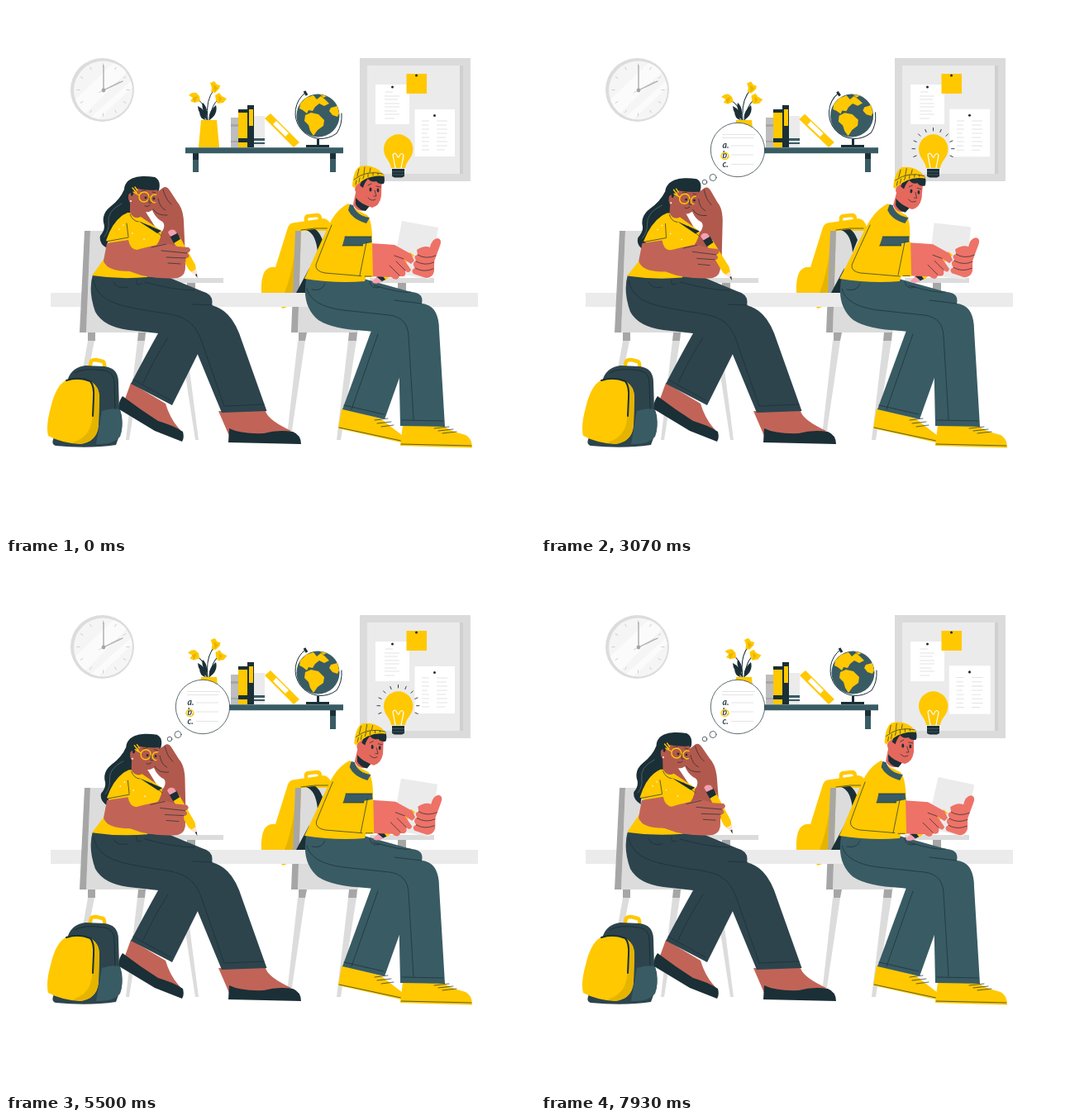
An HTML page for the animation above (8 s loop, 640 px wide and 640 px high).

```html
<!DOCTYPE html>
<html lang="en">
<head>
<meta charset="utf-8">
<title>Exam day</title>
<style>
html,body{margin:0;width:100%;height:100%;overflow:hidden;background:#fff}
svg{display:block;width:100vw;height:100vh}
.y{fill:#ffc800}.ys{fill:#e5b400}.d{fill:#1b2f36}.t{fill:#395b64}.p{fill:#2d444d}
.w{fill:#fff}.g1{fill:#ebebeb}.g2{fill:#dcdcdc}.g3{fill:#a6a6a6}
.s1{fill:#c16457}.s2{fill:#b2594d}.s3{fill:#ee7267}.s4{fill:#e5685d}
.l{fill:none;stroke:#1b2f36;stroke-width:1;stroke-linecap:round;stroke-linejoin:round}
.thin{stroke-width:.7}.bold{stroke-width:2}
.gl{fill:none;stroke:#e3e3e3;stroke-width:1}
.wl{fill:none;stroke:#fff;stroke-width:1.2;stroke-linecap:round}
.yl{fill:none;stroke:#ffc800;stroke-width:1.4;stroke-linecap:round}
.handle{stroke-width:4.5}
text{font:italic 700 10.5px Lato,sans-serif;fill:#2e444d}
</style>
</head>
<body>
<svg viewBox="0 0 640 640">
<!-- clock -->
<g>
<circle class="g2" cx="116.5" cy="101.5" r="38.5"/>
<circle fill="#f5f5f5" cx="117.5" cy="102" r="35.5"/>
<path class="w" d="M84 113 130 69Q140 72 146 80L96 130Q87 123 84 113ZM103 134 151 91 153 98 112 137Z" opacity=".6"/>
<g id="ticks" stroke="#cfcfcf" stroke-width="1"/>
<path d="M118 102V72M118 102 141 91" stroke="#a6a6a6" stroke-width="1.3" stroke-linecap="round"/>
<path d="M112 105 138 91" stroke="#c4c4c4" stroke-width=".7"/>
<circle class="g3" cx="118" cy="102" r="2.4"/>
</g>

<!-- pin board -->
<path fill="#dbdbdb" d="M428 63H562V212H428Z"/>
<path class="g1" d="M437 72H553V203H437Z"/>
<path fill="#cfcfcf" d="M549 72H553V203H549Z"/>
<g id="sheetA"><path class="w" d="M447 95H488V143H447Z"/>
<path class="gl" d="M459 104H468M458 109H476M458 113H474M458 118H476M458 122H476M458 127H473M458 131H476M458 136H470"/><circle class="d" cx="467.5" cy="98" r="1.5"/></g>
<g id="sheetB"><path class="w" d="M494.500 125H543V182H494.500Z"/>
<path class="gl" d="M503 139H512M521 139H534M503 144H511M521 144H533M503 149H512M521 149H534M503 154H510M521 154H534M503 159H512M521 159H532M503 164H512M521 164H534M503 169H511M521 169H534M503 174H512M521 174H531"/><circle class="d" cx="518.500" cy="132.500" r="1.5"/></g>
<g id="note"><path class="y" d="M484.500 82H509V106H484.500Z"/><circle class="d" cx="496.500" cy="84" r="1.5"/></g>

<!-- bulb -->
<g id="rays" stroke="#1b2f36" stroke-width=".9" stroke-linecap="round"/>
<path class="y" d="M466 196C465 187 457 184 457 173A17.700 17.700 0 0 1 492.400 173C492.400 184 484 187 483 196Z"/>
<path class="wl" d="M471 196 468 180Q471 176 473 181Q475 186 476 181Q479 176 481 181L478 196"/>
<path class="d" d="M467 197H482V206L479 207.500H470L467 206Z"/>
<path d="M467 200.500H482M467 204H482" stroke="#59747c" stroke-width=".6"/>

<!-- shelf -->
<path class="t" d="M226 178H233V201H226ZM392 178H399V201H392Z"/>
<path class="d" d="M226 178H233V186H226ZM392 178H399V185H392Z"/>
<g id="stemL"><path class="l" d="M243 138Q244 121 231 112"/><path class="y" d="M221 108Q225 104 230 105L234 109 235 115 228 117 223 115 226 111Z"/><path class="ys" d="M226 111 232 109 228 117Z"/></g>
<g id="stemR"><path class="l" d="M244 138Q241 113 252 101M246 138Q249 118 257 113"/><path class="y" d="M247 93 252 91 255 95 259 96 258 100 253 105 248 104 249 99ZM253 108 258 105 261 109 267 112 263 117 256 118 254 114Z"/><path class="ys" d="M251 95 256 99 252 104ZM257 109 261 112 258 117Z"/></g>
<path class="d" d="M244 138Q232 131 232 121Q241 125 244 138ZM246 138Q244 128 254 120Q257 131 246 138ZM242 138Q234 137 234 127ZM241 131Q236 123 238 117Q244 122 243 132Z"/>
<path class="y" d="M236 138H255L258 171H233Z"/>
<path fill="#bdbdbd" d="M272 135H281V171H272Z"/><path class="g3" d="M272 143H281V146H272ZM272 163H281V165H272Z"/>
<path class="y" d="M281 125H292V171H281Z"/><path class="d" d="M281 125H292V129H281ZM281 160H292V165H281Z"/>
<path class="d" d="M292 120H300V171H292Z"/><path class="y" d="M294 125H299V145H294Z"/>
<path class="g1" d="M300 133H313V171H300Z"/><path class="t" d="M300 160H313V163H300ZM300 165H313V167H300Z"/>
<g id="lean"><path class="y" d="M313 136 320 130 355 165 348 171Z"/><path class="w" d="M323 143 327 139 342 154 338 158Z"/></g>
<g id="globe">
<path class="l" d="M362 105A31 31 0 1 0 400 154Q407 144 406 130"/>
<path d="M361 103 364 108" stroke="#1b2f36" stroke-width="3"/>
<circle class="t" cx="377.500" cy="132.500" r="26"/>
<path class="y" d="M356 118 363 111 372 108 376 113 381 109 386 113 391 118 385 121 379 118 374 122 371 127 366 126 364 130 359 126 355 124ZM362 132 369 129 378 131 385 138 384 145 377 150 372 157 368 151 366 144 361 139ZM380 107 388 109 384 111ZM393 123 401 121 403 130 401 134 395 132 391 127Z"/>
</g>
<path class="d" d="M376 161H379V168H391V171H363V168H376Z"/>
<path class="t" d="M217 171.300H408V178.300H217Z"/>

<!-- thought bubble -->
<g id="bub1"><circle class="l thin" cx="198" cy="213" r="2.800"/></g>
<g id="bub2"><circle class="l thin" cx="208" cy="207.500" r="4"/></g>
<g id="bub3">
<circle class="l thin" cx="238" cy="174" r="32.700" style="fill:#fff"/>
<path class="gl bold" d="M219 155.500H259M219 159.500H257M230 169H257M230 180H257M230 191.500H257"/>
<text x="219.500" y="171.500">a.</text><text x="219.500" y="183.500">b.</text><text x="219.500" y="195">c.</text>
<ellipse class="yl" cx="222.500" cy="181.500" rx="4.500" ry="4"/>
</g>

<!-- boy's chair and bag, behind the desk -->
<path class="yl handle" d="M363 262V257Q363 254 367 254L376 253Q380 253 380 258"/>
<path class="y" d="M341 268Q343 262 350 262L384 257Q392 258 394 268L390 345L335 366 332 363 335 347H309Q308 330 313 321Q318 315 326 316Z"/>
<path class="ys" d="M349 300 347 347H337Q344 330 349 300Z"/>
<path class="g2" d="M353 405H362L345 520H340ZM414 405H424L405 525H400Z"/>
<path class="g3" d="M354 395H364L362 405H354ZM415 395H425L424 405H414Z"/>
<path class="g2" d="M357 272H400L426 395H353Z"/>
<path class="g3" d="M350 272H357L353 395H345Z"/>
<path class="y" d="M344 264 386 258 392 269 366 272H348Z"/>
<path class="d" d="M363 271Q375 275 377 298L383 283Q379 273 374 270ZM351 347 367 317 363 347Z"/>
<path class="l thin" d="M357 271Q374 268 390 269"/>

<!-- desk and girl's chair -->
<path class="g1" d="M54 347H571V364H54Z"/>
<path class="g2" d="M172 329H263V335H172ZM440 329H518V335H440Z"/>
<path class="g3" d="M219 335H229V347H219ZM474 335H484V347H474Z"/>
<path class="g2" d="M216 440H222L233 525H229ZM99 405H107L98 450H91ZM159 405H168L149 525H145Z"/>
<path class="g3" d="M99 395H108V405H99ZM160 395H169L168 405H159Z"/>
<path class="g2" d="M102 272H160L170 395H97Z"/>
<path class="g3" d="M95 272H102L97 395H89Z"/>

<!-- backpack -->
<path class="yl handle" d="M101 438 103 430Q104 428 109 428L117 430Q120 431 119 439"/>
<path class="p" d="M75 451Q80 437 96 435L119 436Q136 438 136 455L137 488Q142 495 140 512L133 531Q100 536 60 532Q54 530 58 522Z"/>
<path class="t" d="M116 490Q128 486 138 488Q143 510 138 521Q130 531 109 530Z"/>
<path class="l" d="M83 444Q94 437 119 441Q131 443 131 456L132 487"/>
<path class="y" d="M72 453Q86 449 101 454Q113 459 113 474L112 506Q111 527 90 530Q68 529 51 520Q48 508 54 486Q60 460 72 453Z"/>
<path class="ys" d="M104 455Q113 461 113 474L112 506Q111 527 90 530L80 528Q102 522 104 500Q109 475 104 455Z"/>
<path class="l bold" d="M73 453Q88 448 102 454Q107 460 106 474L105 496"/>

<!-- girl, legs -->
<path class="s1" d="M151 456 193 481Q199 501 211 513L204 517 143 478Z"/>
<path class="d" d="M141 472Q162 488 184 502Q204 508 214 515Q216 523 213 527L180 514 137 488Q135 480 141 472Z"/>
<path class="s1" d="M257 490H314Q317 501 345 514L335 520H270Z"/>
<path class="d" d="M270 511Q284 518 312 517Q329 512 347 515Q357 519 357 530L269 528Z"/>
<path class="p" d="M184 385V396Q165 430 151 457L201 483 235 415 225 385Z"/>
<path class="l thin" d="M196 401Q177 431 166 456M154 452 199 477"/>
<path class="p" d="M105 325Q99 345 108 370Q118 388 148 392L193 397Q218 400 228 412L261 492 315.500 490 286 407Q279 384 268 373Q260 365 249 362Q252 349 237 345L196 328Z"/>
<path class="l thin" d="M106 332C112 361 142 363 180 370C213 374 225 379 235 401L264 484 312 482M130 334Q134 343 147 340M158 331Q156 340 164 336M168 334Q204 344 228 344M250 362 226 361"/>

<!-- girl, upper body -->
<g id="girlTop">
<g id="girlHead">
<path class="d" d="M143 222C144 207 161 204 180 207Q188 211 185 223L166 244Q151 252 139 257Q133 267 130 280Q121 283 122 293Q112 287 114 278Q121 270 118 262Q116 251 126 243Q138 234 143 222Z"/>
<path class="wl" style="stroke:#6b7f85;stroke-width:.6" d="M140 239Q122 248 124 262Q125 271 119 279"/>
</g>
<path class="s2" d="M150 236 167 246 181 268 172 274 150 255Z"/>
<path class="s2" d="M190 220Q194 217 198 223L207 237Q214 244 215 260L217 305H178L178 285 190 271Q194 262 186 259Q177 252 176 241L181 237 179 228Z"/>
<path class="y" d="M147 250Q130 257 121 284L130 289Q117 309 104 326Q138 331 171 328L175 297Q188 286 188 272L163 255Q155 259 150 250Z"/>
<path class="d" d="M160 260 167 263 188 272 183 275Z"/>
<path class="l thin" d="M150 252Q153 260 160 261M146 263 148 279M121 285 148 280M174 266 188 278"/>
<g class="w"><circle cx="137" cy="270" r=".8"/><circle cx="153" cy="275" r=".8"/><circle cx="167" cy="282" r=".8"/><circle cx="121" cy="313" r=".8"/><circle cx="142" cy="265" r=".8"/></g>
<g id="girlFace">
<path class="s2" d="M153 219Q166 224 183 222L184 233Q182 246 173 249Q161 251 156 241Q147 240 148 229Q150 224 153 228Z"/>
<path class="d" d="M151 229Q150 213 167 209Q181 210 185 222Q173 224 161 220Q155 222 153 230Z"/>
<path class="yl" d="M153 220 158 226M156 219 159 223M154 225 161 229"/>
<circle class="yl" cx="167" cy="231" r="6"/><circle class="yl" cx="180" cy="233" r="5"/>
<path class="l thin" d="M173 232 173 238 176 238M168 242Q171 244 174 241M164 224 169 223M177 225 181 226"/>
<circle class="d" cx="169" cy="232" r="1.400"/><circle class="d" cx="179" cy="233" r="1.400"/>
<circle class="w" cx="151" cy="236" r="1"/>
</g>
<path class="s2" d="M190 220Q194 218 198 224L209 240 207 264 188 260Q177 252 176 242L182 237 180 231Z"/>
<path class="l thin" d="M190 222Q193 234 200 240M184 233Q186 244 193 247M178 246Q183 254 195 253"/>
</g>
<path class="s1" d="M118 310 150 295 217 298V314Q218 326 208 329Q190 331 164 326Z"/>
<g id="pencil">
<path class="y" d="M202 284 210 279 229 313 231 327 221 319Z"/><path fill="#fbe3cf" d="M224 322 230 318 231.500 328Z"/>
<path class="d" d="M198 278 207 274 211 282 203 287ZM229 325 231 324 231.500 329Z"/><path fill="#f3a0b0" d="M196 274Q198 269 204 271L207 275 199 279Z"/>
</g>
<g id="girlArm">
<path class="s1" d="M122 287 148 283Q150 294 158 295Q180 289 194 287L208 291 221 292Q226 296 219 299Q225 303 217 306Q220 311 211 312Q202 315 192 312Q180 319 150 321Q121 321 118 308Z"/>
<path class="l thin" d="M188 296 219 299M194 304 217 305M196 311 211 312M176 292Q185 290 194 288"/>
</g>

<!-- boy, legs -->
<path class="y" d="M406 487 453 499 480 520 478 528 402 511Z"/><path class="l thin" d="M403 510 478 526M446 501 462 499M449 505 466 503M454 509 469 507"/>
<path class="y" d="M480 507 529 508Q536 514 556 519Q564 523 564 534.500L477 532Z"/><path class="l thin" d="M478 530 563 532M518 511 536 509M523 514 541 512M528 517 545 515"/>
<path class="t" d="M443 390 407 488 458 500 478 444 474 392Z"/><path class="l thin" d="M450 397 418 488M409 483 457 494"/>
<path class="t" d="M364 326Q356 362 378 380Q395 391 435 393L464 396Q475 398 475 413L477 508 531 509 524 392Q524 362 503 360Q506 347 490 346L433 330Z"/>
<path class="l thin" d="M364 342Q369 363 408 368L464 374Q486 377 487 399L493 500M479 501 529 502M440 334Q443 344 452 340M386 336Q382 346 370 343M503 360 470 356M445 338Q478 348 490 346"/>

<!-- boy, upper body -->
<g id="boyTop">
<path class="y" d="M414 239Q400 246 391 264L361 330Q400 336 434 333L443 300 443 283Q443 260 437 253L425 247Z"/>
<path class="t" d="M416 240 414 247Q419 258 436 263L440 256Q424 254 420 241Z"/>
<path class="t" d="M410 279H442L443 290H407Z"/><path class="l thin" d="M410 279H442M407 290H443M394 265Q383 292 375 313Q374 321 386 323L434 327"/>
</g>
<g id="boyHead">
<path class="s4" d="M424 221 441 237 435 247Q424 250 420 240Z"/><path class="d" d="M423 232Q431 241 440 242L435 248Q427 247 423 240Z"/>
<path class="s4" d="M427 209 455 209Q454 220 454 230Q452 242 443 244Q429 240 427 226Q420 226 423 217Z"/>
<path class="d" d="M432 207 457 204Q459 211 457 215Q451 216 448 212Q442 214 438 209Q434 213 432 220L428 217Z"/>
<path class="y" d="M419 218Q420 199 428 194Q441 191 452 199L458 206Q437 203 421 220Z"/>
<path class="l thin" d="M421 210Q436 198 456 203M424 211 423 216M428 208 427 213M433 205 432 209M438 203 438 207M444 202 444 205M450 202 450 204M427 197 425 206M434 195 433 203M441 196 440 201"/>
<ellipse class="d" cx="441" cy="222" rx="1.500" ry="2.500"/><ellipse class="d" cx="450" cy="223" rx="1.400" ry="2.400"/>
<path class="l thin" d="M438 217 442 215M448 218 453 219M446 223 448 230 445 230M438 232Q442 237 447 234"/>
</g>
<g id="boyHands">
<path id="paper" class="g1" d="M479 260 523 268 512 331 467 322Z"/>
<path class="y" d="M489 298 494 302 459 332 452 326Z"/><path class="d" d="M448 328 454 324 459 331 453 334Z"/><path fill="#f3a0b0" d="M443 333 449 328 455 333Q450 337 444 335Z"/>
<path class="s3" d="M440 287Q458 288 470 289L490 300 494 308 490 312 481 306 490 319Q488 325 483 320Q485 329 476 327Q473 334 466 328L435 327Z"/>
<path class="l thin" d="M481 306 470 302M483 320 472 309M476 326 464 314"/>
<path class="s3" d="M497 295Q506 289 513 292Q515 282 522 281Q528 282 525 290L518 309 518 321Q516 329 508 329L493 324Q489 319 495 317Q490 311 496 308Q492 302 498 301Z"/>
<path class="l thin" d="M498 301Q508 307 520 302M496 309Q507 315 518 310M495 317Q505 323 517 318"/>
<path class="y" d="M432 288 443 286 444 328 430 328Z"/><path class="l thin" d="M436 286 428 326M434 327H442"/>
</g>
</svg>
<script>
const $ = id => document.getElementById(id);
const move = (id, value) => $(id).setAttribute('transform', value);
const clamp = v => Math.max(0, Math.min(1, v));

function spokes(id, cx, cy, r1, r2, angles) {
  return angles.map(a => {
    const line = document.createElementNS('http://www.w3.org/2000/svg', 'line');
    const x = Math.cos(a), y = Math.sin(a);
    line.setAttribute('x1', cx + r1 * x);
    line.setAttribute('y1', cy + r1 * y);
    line.setAttribute('x2', cx + r2 * x);
    line.setAttribute('y2', cy + r2 * y);
    return $(id).appendChild(line);
  });
}
const spread = (n, from, span) => Array.from({length: n}, (_, i) => from + span * i / (n - 1));
spokes('ticks', 117.5, 101.5, 28, 32, spread(12, 0, Math.PI * 11 / 6));
const rays = spokes('rays', 474.5, 173, 22, 25.5, spread(11, Math.PI * .88, Math.PI * 1.24));

const sway = t => Math.cos((t - 3100) * Math.PI / 5000);
const bump = (t, mid, half) => Math.abs(t - mid) < half ? (1 + Math.cos((t - mid) / half * Math.PI)) / 2 : 0;
const twice = (t, mid, half) => bump(t, mid, half) + bump(t, mid + 5000, half);
const shear = (k, base, dy) => `matrix(1 0 ${-k} 1 ${k * base} ${dy})`;
const grow = (s, x, y) => `translate(${x} ${y}) scale(${s}) translate(${-x} ${-y})`;

function pop(id, t, start, x, y) {
  const p = clamp((t - start) / 300);
  $(id).setAttribute('opacity', p);
  move(id, grow(1 - (1 - p) ** 3, x, y));
}

function draw(t) {
  const d = sway(t) - sway(0);

  move('girlTop', shear(.051 * d, 328, .4 * d));
  move('girlHead', `translate(0 ${1.2 * d})`);
  move('girlFace', `translate(0 ${1.2 * d})`);
  move('girlArm', `translate(124 300) rotate(${.9 * d}) scale(${1 - .055 * Math.max(0, d)} 1) translate(-124 -300)`);
  move('pencil', `translate(${-.4 * d} ${2.2 * d}) rotate(${-1.8 * d} 231 328)`);

  move('boyTop', shear(.045 * d, 332, 0));
  move('boyHead', `translate(${4.4 * d} ${1.1 * d}) rotate(${2 * d} 432 242)`);
  move('boyHands', `translate(${3 * d} ${-.5 * d})`);
  move('paper', `translate(${-3.4 * d} ${1.2 * d}) rotate(${-3 * d} 500 300)`);

  move('stemL', `rotate(${-4.2 * d} 243 138)`);
  move('stemR', `rotate(${2 * d} 245 138)`);
  const tip = bump(t, 2850, 1400);
  move('globe', `rotate(${-2.5 * tip} 377 166)`);
  move('lean', `rotate(${-1.4 * tip} 352 170)`);

  const pulse = twice(t, 1900, 900);
  move('note', grow(1 + .11 * pulse, 496.5, 94));
  move('sheetA', grow(1 + .06 * pulse, 467.5, 119));
  move('sheetB', grow(1 + .07 * twice(t, 2600, 600), 518.5, 153));

  rays.forEach((ray, i) => {
    const on = clamp((t - 1700 - i * 75) / 130), off = clamp((t - 5850 - i * 40) / 130);
    ray.setAttribute('opacity', on * (1 - off));
  });
  pop('bub1', t, 400, 198, 213);
  pop('bub2', t, 600, 208, 207);
  pop('bub3', t, 800, 216, 198);
}

let start;
function frame(now) {
  start ??= now;
  draw((now - start) % 8000);
  requestAnimationFrame(frame);
}
draw(0);
requestAnimationFrame(frame);
</script>
</body>
</html>
```
